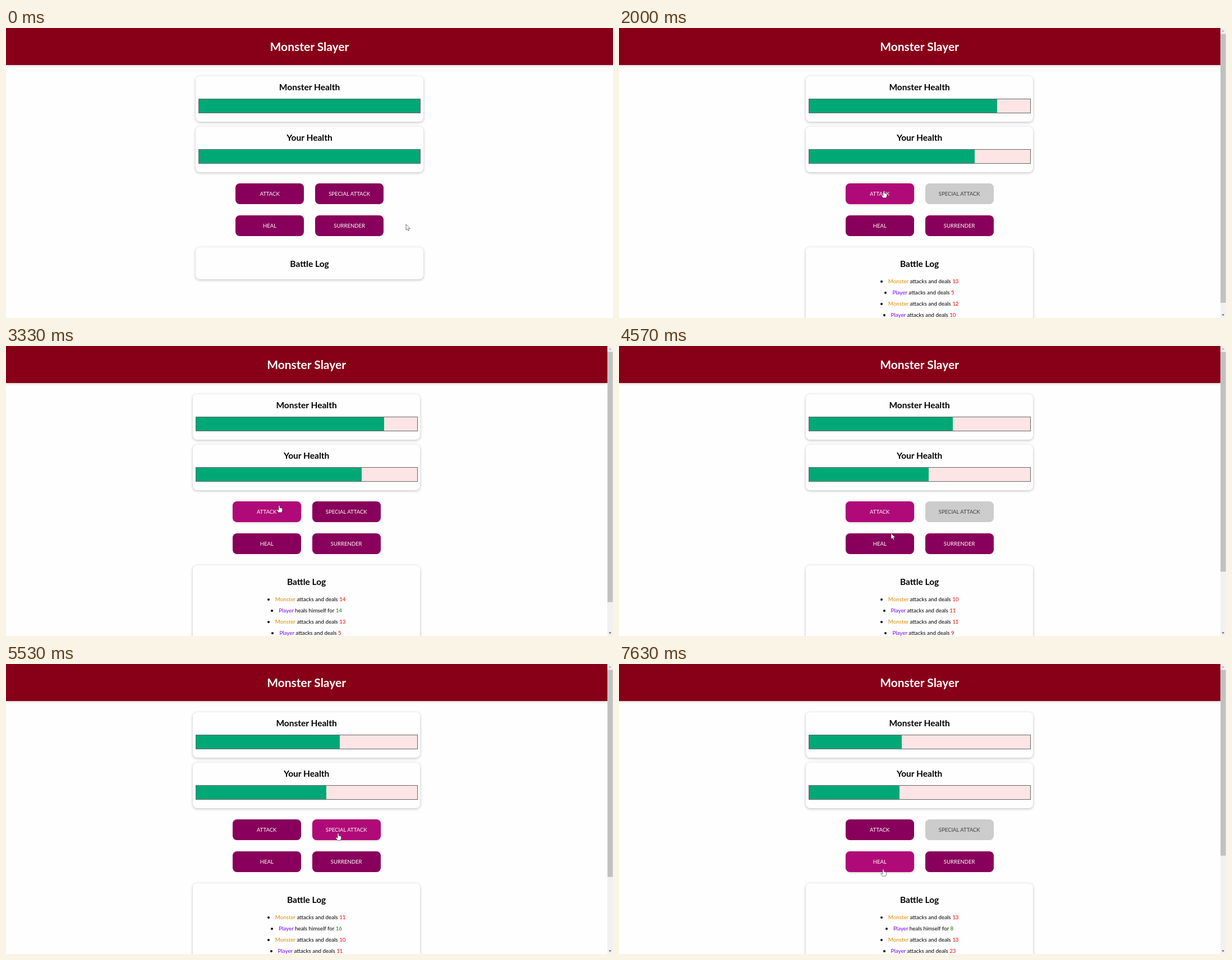
Animation, 1082 px wide and 517 px high, one loop 8 s. Source, as an HTML page:

```html
<!DOCTYPE html>
<html lang="en">
<head>
<meta charset="utf-8">
<title>Monster Slayer</title>
<style>
  * { box-sizing: border-box; }
  html, body { margin: 0; width: 100%; height: 100%; overflow: hidden; background: #fefefe; }
  body { position: relative; font: 9.8px/20px Lato, sans-serif; color: #000; }
  #page { position: absolute; left: 0; top: 0; height: 517px; text-align: center; }
  header, .card, .button { position: absolute; }
  header { left: 0; right: -.8px; height: 66px; padding-right: .8px; background: #880017; color: #fff; }
  header, .card { box-shadow: 0 1.3px 5px rgba(0, 0, 0, .26); }
  h1, h2 { margin: 0; font-weight: 700; }
  h1 { font-size: 21px; line-height: 66px; }
  h2 { font-size: 15.5px; line-height: 38px; }
  .card { left: 50%; width: 405.7px; margin-left: -202.85px; border-radius: 7.6px; background: #fefefe; }
  .health { height: 80.6px; }
  .bar { position: absolute; left: 5.07px; right: 4.6px; top: 40px; height: 26px;
         border: 1px solid #666; background: #fde5e5; }
  .bar div { height: 100%; background: #00a876; }
  #log { top: 390.7px; }
  #log h2 { line-height: 59px; height: 50.3px; }
  ul { margin: 0; padding: 0; list-style: none; }
  li { height: 20px; white-space: pre; }
  li::before { content: ""; display: inline-block; width: 4px; height: 4px; margin-right: 10px;
               border-radius: 50%; background: #000; vertical-align: 1px; }
  .player { color: #7700ff; }
  .monster { color: #da8d00; }
  .damage { color: red; }
  .heal { color: green; }
  .button { width: 121.7px; height: 36.6px; border-radius: 7.6px; background: #88005b; color: #fff;
            font-size: 9.55px; line-height: 37px; }
  .button.hover { background: #af0a78; box-shadow: .6px .6px 5px rgba(77, 51, 51, .26); }
  .button.disabled { background: #ccc; color: #3f3f3f; box-shadow: none; }
  svg { position: absolute; left: 0; top: 0; }
</style>
</head>
<body>
<div id="page">
  <header><h1>Monster Slayer</h1></header>
  <div class="card health" style="top:86px"><h2>Monster Health</h2><div class="bar"><div id="monsterBar"></div></div></div>
  <div class="card health" style="top:176.4px"><h2>Your Health</h2><div class="bar"><div id="playerBar"></div></div></div>
  <div class="card" id="log"><h2>Battle Log</h2><ul id="entries"></ul></div>
</div>
<svg width="1082" height="517">
  <g id="scrollbar">
    <path fill="#f1f1f1" d="M1072 0H1082V517H1072Z"/>
    <path fill="#a3a3a3" d="M1074.4 6.6L1076.8 4.1L1079.2 6.6Z"/>
    <path fill="#505050" d="M1074.4 510.6L1076.8 513.1L1079.2 510.6Z"/>
    <rect id="thumb" x="1072.2" y="10.5" width="9.4" fill="#c1c1c1"/>
  </g>
  <g id="cursor" stroke-linejoin="round">
    <path id="arrow" fill="#fff" stroke="#444" stroke-width=".7" d="M0 0V10.3L2.4 8.1L4 11.6L5.6 10.9L4.1 7.5H7.3Z"/>
    <path id="hand" fill="#fff" stroke="#333" stroke-width=".6"
      d="M-1 1Q0 -.6 1 1V4.6Q2.1 4 2.7 5Q3.8 4.5 4.3 5.5Q5.5 5.2 5.6 6.7V9.3L4.4 12.8H-1.4L-4 8.8Q-4.4 7.3 -3 7.5L-1 9Z"/>
    <g id="forbidden" fill="none">
      <path d="M-2.9 -2.9L2.9 2.9M0 -4.3A4.3 4.3 0 1 0 .01 -4.3" stroke="#222" stroke-width="2.5"/>
      <path d="M-2.9 -2.9L2.9 2.9M0 -4.3A4.3 4.3 0 1 0 .01 -4.3" stroke="#fff" stroke-width="1.2"/>
    </g>
  </g>
</svg>
<script>
const DURATION = 8000, FPS = 30, SCROLLBAR = 10.8;
const BUTTON_WIDTH = 121.7, BUTTON_HEIGHT = 36.6;
const FORBIDDEN_AT = 199;
const byId = id => document.getElementById(id);

// Clicks: tick, player's action, its amount, monster's damage
const rounds = [
  [44, 'attack', 10, 12], [60, 'attack', 5, 13], [86, 'heal', 14, 14], [115, 'attack', 9, 11],
  [128, 'attack', 11, 10], [154, 'heal', 16, 11], [181, 'attack', 23, 13], [229, 'heal', 8, 13]
];

// Pointer path: tick, x, y
const path = [
  [14, 713, 350], [27, 472, 290], [67, 472, 290], [73, 477, 355], [96, 477, 355], [100, 487, 284],
  [133, 487, 284], [136, 486, 312], [137, 485, 334], [141, 481, 354], [158, 481, 354],
  [166, 592, 301.5], [209, 592, 301.5], [214, 471, 365.5]
];

const buttons = [
  ['ATTACK', -131.7, 277.2], ['SPECIAL ATTACK', 10.3, 277.2],
  ['HEAL', -131.7, 334.2], ['SURRENDER', 10.3, 334.2]
].map(([label, dx, y]) => {
  const el = document.createElement('div');
  el.className = 'button';
  el.textContent = label;
  el.style.cssText = `left:calc(50% + ${dx}px);top:${y}px`;
  byId('page').append(el);
  return { el, dx, y, special: label.startsWith('SPECIAL') };
});

const span = (cls, text) => `<span class="${cls}">${text}</span>`;
const attackLine = (who, amount) =>
  `<li>${span(who.toLowerCase(), who)} attacks and deals ${span('damage', amount)}</li>`;
const healLine = amount => `<li>${span('player', 'Player')} heals himself for ${span('heal', amount)}</li>`;

function pointerAt(tick) {
  const next = path.findIndex(p => p[0] > tick);
  if (next < 1) return (next ? path[path.length - 1] : path[0]).slice(1);
  const [t0, x0, y0] = path[next - 1], [t1, x1, y1] = path[next];
  const u = (tick - t0) / (t1 - t0), s = u * u * (3 - 2 * u);
  return [x0 + (x1 - x0) * s, y0 + (y1 - y0) * s];
}

function buttonAt([x, y], center) {
  const inside = (value, from, size) => value >= from && value <= from + size;
  return buttons.find(b => inside(x, center + b.dx, BUTTON_WIDTH) && inside(y, b.y, BUTTON_HEIGHT));
}

let shownRounds = -1;
function showBattle(count) {
  if (count === shownRounds) return;
  shownRounds = count;
  let monster = 100, player = 100, lines = '';
  for (const [, action, amount, damage] of rounds.slice(0, count)) {
    if (action === 'heal') player += amount; else monster -= amount;
    player -= damage;
    lines = attackLine('Monster', damage) + (action === 'heal' ? healLine(amount) : attackLine('Player', amount)) + lines;
  }
  byId('monsterBar').style.width = monster + '%';
  byId('playerBar').style.width = player + '%';
  byId('entries').innerHTML = lines;
  byId('log').style.height = 57.6 + 40 * count + 'px';
  byId('thumb').setAttribute('height', 497 * 517 / (456 + 40 * count));
}

function render(time) {
  const tick = Math.floor((time % DURATION + 4) * FPS / 1000);
  const count = rounds.filter(r => r[0] <= tick).length;
  const scrolls = count > 1;
  const width = 1082 - (scrolls ? SCROLLBAR : 0);
  byId('page').style.width = width + 'px';
  byId('scrollbar').style.display = scrolls ? '' : 'none';
  showBattle(count);

  // The highlight trails the pointer by one tick
  const hovered = buttonAt(pointerAt(tick - 1), width / 2);
  for (const b of buttons) {
    b.el.classList.toggle('hover', b === hovered);
    b.el.classList.toggle('disabled', b.special && count % 3 > 0);
  }

  const pointer = pointerAt(tick), target = buttonAt(pointer, width / 2);
  const blocked = target && target.special && count % 3 > 0 && tick >= FORBIDDEN_AT;
  const shape = !target ? 'arrow' : blocked ? 'forbidden' : 'hand';
  for (const id of ['arrow', 'hand', 'forbidden']) byId(id).style.display = id === shape ? '' : 'none';
  byId('cursor').setAttribute('transform', `translate(${pointer})`);
}

const start = performance.now();
function loop() {
  render(performance.now() - start);
  requestAnimationFrame(loop);
}
loop();
</script>
</body>
</html>
```
